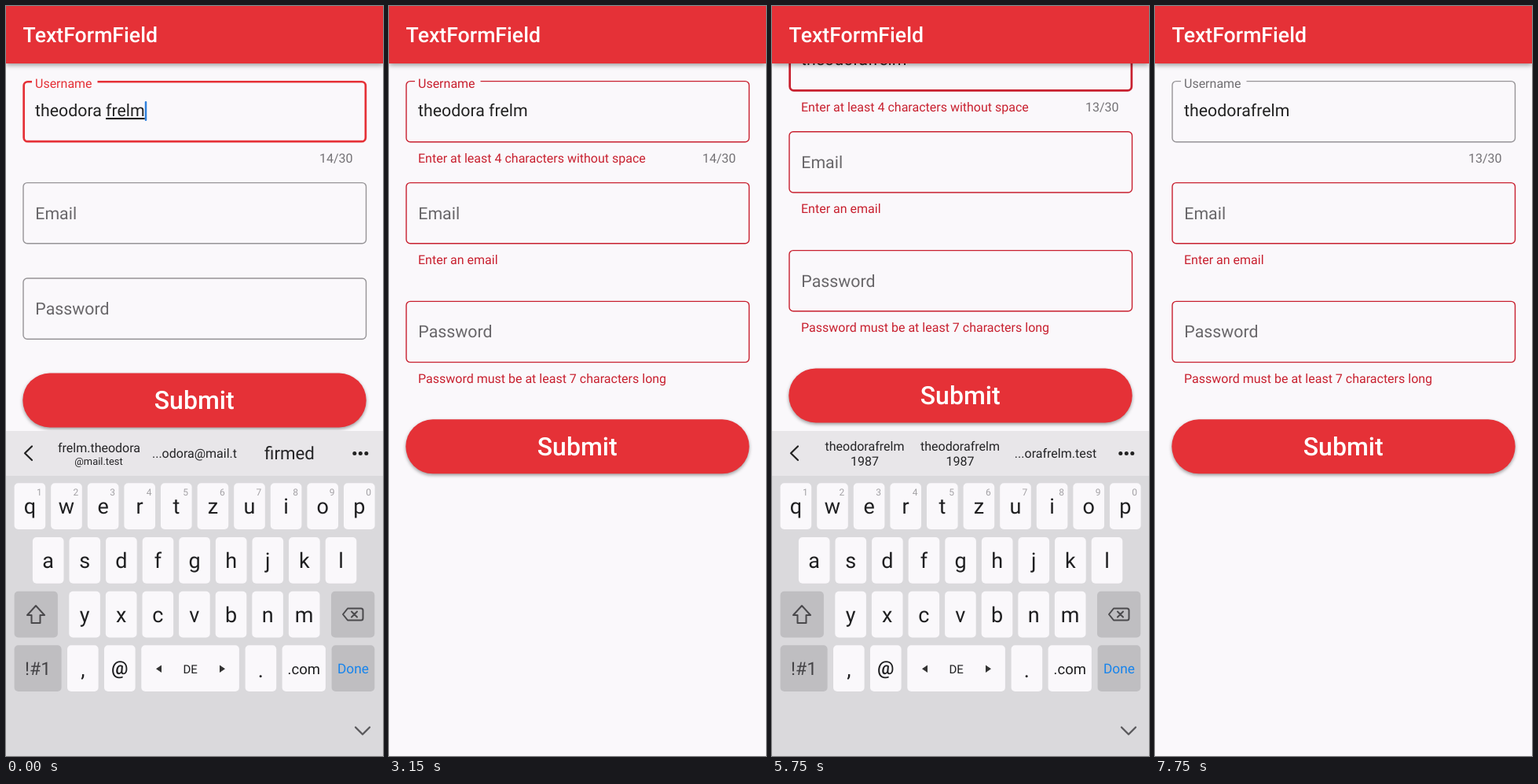
An HTML page that plays this animation: 480x953 px, repeating every 8000 ms.

```html
<!DOCTYPE html>
<html lang="en">
<head>
<meta charset="utf-8">
<title>Form validation</title>
<style>
  html, body { margin: 0; width: 100%; height: 100%; overflow: hidden; background: #faf8fb; }
  svg { display: block; width: 100%; height: 100%; font-family: Roboto, sans-serif; text-rendering: geometricPrecision; }
  .mid { text-anchor: middle; }
  .input { font-size: 21.33px; fill: #222; }
  .hint { font-size: 21.33px; fill: #69676a; }
  .small { font-size: 16px; }
  .error { font-size: 16px; fill: #c8202f; }
  .letter { font-size: 27px; fill: #1f1f21; }
  .line { fill: none; stroke-linecap: round; stroke-linejoin: round; }
</style>
</head>
<body>
<svg viewBox="0 0 480 953">
  <defs><clipPath id="pill"><rect x="21.3" y="0" width="437.4" height="69" rx="34.5"/></clipPath></defs>
  <rect width="480" height="953" fill="#faf8fb"/>
  <g id="page">
    <rect id="userBox" class="line" x="22" width="436.5" rx="5"/>
    <path d="M33 96H116.5" stroke="#faf8fb" stroke-width="6"/>
    <text id="label" class="small" x="37" y="104">Username</text>
    <text id="user" class="input" x="37" y="140"></text>
    <rect id="cursor" y="121" width="2.5" height="25" rx="1" fill="#2f80dc"/>
    <path id="handle" d="M0 145L10.5 155.5A14.6 14.6 0 1 1 -10.5 155.5Z" fill="#2d9cee"/>
    <text id="userError" class="error" x="37">Enter at least 4 characters without space</text>
    <text id="count" class="small" x="441.5" y="198.5" text-anchor="end" fill="#747276"></text>
    <rect id="mailBox" class="line" x="22" y="224.6" width="436.5" height="77.2" rx="5" stroke-width="1.4"/>
    <text class="hint" x="37.3" y="270.5">Email</text>
    <text id="mailError" class="error" x="37">Enter an email</text>
    <g id="passGroup">
      <rect id="passBox" class="line" x="22" y="346" width="436.5" height="77.2" rx="5" stroke-width="1.4"/>
      <text class="hint" x="37.3" y="392">Password</text>
    </g>
    <text id="passError" class="error" x="37">Password must be at least 7 characters long</text>
    <g id="button">
      <rect id="buttonFill" x="21.3" width="437.4" height="69" rx="34.5" fill="#e53137"/>
      <g clip-path="url(#pill)" fill="#fff">
        <rect id="glow" width="480" height="69"/>
        <circle id="splash" cx="440" cy="39"/>
      </g>
      <text class="mid" x="239.7" y="45.3" font-size="32" font-weight="500" fill="#fff">Submit</text>
    </g>
  </g>
  <g>
    <rect y="-10" width="480" height="83" fill="#e53137" style="filter:drop-shadow(0 2px 3px #0006)"/>
    <text x="21.6" y="46" font-size="26.67" font-weight="500" fill="#fff">TextFormField</text>
  </g>
  <g id="keyboard">
    <rect y="540" width="480" height="413" fill="#dad9dc"/>
    <rect y="540" width="480" height="57" fill="#e8e6e9"/>
    <path class="line" d="M33 559.5L24 568.3L33 577" stroke="#222" stroke-width="2.2"/>
    <g fill="#222"><circle cx="443.8" cy="568.5" r="2.5"/><circle cx="451.3" cy="568.5" r="2.5"/><circle cx="458.8" cy="568.5" r="2.5"/></g>
    <g id="firstTips" class="mid small" fill="#242426">
      <text x="118.5" y="567">frelm.theodora</text>
      <text x="118" y="582.5" font-size="12.9">@mail.test</text>
      <text x="240" y="574">...odora@mail.t</text>
      <text x="361" y="576" font-size="22.3">firmed</text>
    </g>
    <g id="nextTips" class="mid small" fill="#242426">
      <text x="118" y="565">theodorafrelm</text><text x="118" y="584">1987</text>
      <text x="239.5" y="565">theodorafrelm</text><text x="239.5" y="584">1987</text>
      <text id="thirdTip" x="361" y="574">...orafrelm.test</text>
    </g>
    <g id="keys"></g>
    <g class="line" stroke="#4a494c" stroke-width="2">
      <path d="M38 762L49 774H43.5V784H32.5V774H27Z"/>
      <path d="M429 773L435 765.5H452Q454.5 765.5 454.5 768V778Q454.5 780.5 452 780.5H435ZM440 769.5L447 776.5M447 769.5L440 776.5"/>
    </g>
    <path d="M191 842.3L198 837.5V847ZM279 842.3L272 837.5V847Z" fill="#333"/>
    <path id="chevron" class="line" d="M445 916.5L454 925.5L463 916.5" stroke="#59585b" stroke-width="2.3"/>
  </g>
</svg>
<script>
const LOOP = 8000;
const RED = '#e53137', ERROR = [200, 32, 47], GREY = [150, 148, 151];
const SUBMITS = [{ down: 800, up: 1690 }, { down: 6350, up: 7000 }];
const FOCUS_AT = 3550, DELETE_AT = 5100, MAX_SCROLL = 72.7;

const el = Object.fromEntries([...document.querySelectorAll('[id]')].map(node => [node.id, node]));
const set = (node, attrs) => { for (const name in attrs) node.setAttribute(name, attrs[name]); };
const show = (node, visible) => set(node, { visibility: visible ? 'inherit' : 'hidden' });
const ramp = (t, start, length) => Math.min(1, Math.max(0, (t - start) / length));
const easeOut = p => 1 - (1 - p) ** 3;
const mix = (a, b, p) => `rgb(${a.map((v, i) => Math.round(v + (b[i] - v) * p))})`;

function buildKeys() {
  const parts = [];
  const key = (x, y, w, text, opt = {}) => parts.push(
    `<rect ${opt.id ? `id="${opt.id}"` : ''} x="${x}" y="${y}" width="${w}" height="58.7" rx="5" fill="${opt.fill || '#faf8fb'}"/>`,
    `<text class="mid letter" x="${x + w / 2}" y="${y + (opt.base || 39)}" style="${opt.style || ''}">${text}</text>`);
  const row = (letters, x, y) => [...letters].forEach((c, i) => key(x + i * 46.6, y, 39.6, c));
  const dark = '#bfbec1';

  row('qwertzuiop', 10.6, 606.3);
  row('asdfghjkl', 33.9, 675);
  row('yxcvbnm', 80.3, 743.7);
  [...'1234567890'].forEach((n, i) => parts.push(
    `<text class="mid" x="${42.3 + i * 46.6}" y="622" font-size="12" fill="#a3a1a5">${n}</text>`));
  key(10.6, 743.7, 55.3, '', { fill: dark });
  key(414, 743.7, 55.3, '', { fill: dark, id: 'backspace' });

  const y = 812.3;
  key(10.6, y, 60, '!#1', { fill: dark, base: 38, style: 'font-size:23px;fill:#444346' });
  key(78, y, 39.6, ',', { base: 40 });
  key(125, y, 39.6, '@', { base: 37, style: 'font-size:24px;font-weight:500' });
  key(172.3, y, 124.6, 'DE', { base: 35.5, style: 'font-size:15px' });
  key(304.6, y, 39.6, '.', { base: 41 });
  key(351.6, y, 55.3, '.com', { base: 37, style: 'font-size:18.5px' });
  key(414.6, y, 54.7, 'Done', { fill: dark, base: 36, style: 'font-size:17.3px;fill:#1784ec' });
  el.keys.innerHTML = parts.join('');
  el.backspace = document.getElementById('backspace');
}

function drawForm(t) {
  const failed = t >= SUBMITS[0].up, passed = t >= SUBMITS[1].up;
  const focused = t < SUBMITS[0].up || (t >= FOCUS_AT && !passed);
  const deleted = t >= DELETE_AT;
  const errorIn = ramp(t, SUBMITS[0].up, 167);
  const errorOut = ramp(t, SUBMITS[1].up, 130);

  const userColor = failed ? mix(ERROR, GREY, errorOut) : RED;
  const weight = focused ? 2.7 : 1.4, inset = (weight - 1.4) / 2;
  set(el.userBox, {
    x: 22 + inset, y: 95.6 + inset, width: 436.5 - 2 * inset, height: 77.2 - 2 * inset,
    stroke: userColor, 'stroke-width': weight
  });
  set(el.label, { fill: failed ? mix(ERROR, [112, 110, 114], errorOut) : RED });

  const text = !failed ? 'theodora <tspan text-decoration="underline">frelm</tspan>'
    : deleted ? 'theodorafrelm' : 'theodora frelm';
  if (el.user.dataset.text !== text) {
    el.user.innerHTML = text;
    el.user.dataset.text = text;
  }
  el.count.textContent = deleted ? '13/30' : '14/30';

  const caret = 37 + (failed ? el.user.getSubStringLength(0, deleted ? 8 : 9) : el.user.getComputedTextLength());
  const blinkStart = deleted ? DELETE_AT : failed ? 3400 : -100;
  set(el.cursor, { x: caret });
  show(el.cursor, focused && (t - blinkStart) % 1000 < 500);
  set(el.handle, { transform: `translate(${caret})` });
  show(el.handle, focused && failed && !deleted);

  const slide = (1 - errorIn) * -5;
  set(el.userError, { y: 199 + slide, opacity: errorIn * (1 - errorOut) });
  set(el.mailError, { y: 328 + slide, opacity: errorIn });
  set(el.passError, { y: 478.7 + slide, opacity: errorIn });
  for (const box of [el.mailBox, el.passBox]) set(box, { stroke: mix(GREY, ERROR, errorIn) });
  set(el.passGroup, { transform: `translate(0 ${failed ? 29.4 : 0})` });
  set(el.button, { transform: `translate(0 ${failed ? 525.3 : 466.5})` });
}

function drawPress(t) {
  const { down, up } = SUBMITS[t < 3000 ? 0 : 1];
  const fade = 1 - ramp(t, up, 300);
  const press = ramp(t, down, 200) * fade;
  const radius = Math.max(0, t - down) * 0.407 + Math.max(0, t - up) * 1.3;
  set(el.glow, { opacity: 0.16 * press });
  set(el.splash, { r: radius, opacity: 0.14 * fade });
  el.buttonFill.style.filter = `drop-shadow(0 ${2 + 3 * press}px ${2 + 2 * press}px rgba(0,0,0,.38))`;
}

function drawKeyboard(t) {
  const closing = SUBMITS.map(s => s.up + 130);
  const hidden = t < FOCUS_AT ? ramp(t, closing[0], 220) ** 2
    : t < closing[1] ? 1 - easeOut(ramp(t, FOCUS_AT + 100, 250))
    : ramp(t, closing[1], 220) ** 2;
  const drop = 413 * hidden;
  set(el.keyboard, { transform: `translate(0 ${drop})` });
  show(el.chevron, !SUBMITS.some(s => t >= s.up + 10 && t < s.up + 1000));
  show(el.firstTips, t < FOCUS_AT);
  show(el.nextTips, t >= FOCUS_AT);
  show(el.thirdTip, t >= DELETE_AT + 100);
  set(el.backspace, { fill: Math.abs(t - DELETE_AT) < 50 ? '#a9a8ab' : '#bfbec1' });

  // The page settles back as the closing keyboard frees room below it.
  const dragged = MAX_SCROLL * easeOut(ramp(t, 5500, 480));
  const slack = t < closing[1] + 25 ? 0 : drop;
  set(el.page, { transform: `translate(0 ${-Math.max(0, dragged - slack)})` });
}

function frame(now) {
  const t = now % LOOP;
  drawForm(t);
  drawPress(t);
  drawKeyboard(t);
  requestAnimationFrame(frame);
}

buildKeys();
requestAnimationFrame(frame);
</script>
</body>
</html>
```
